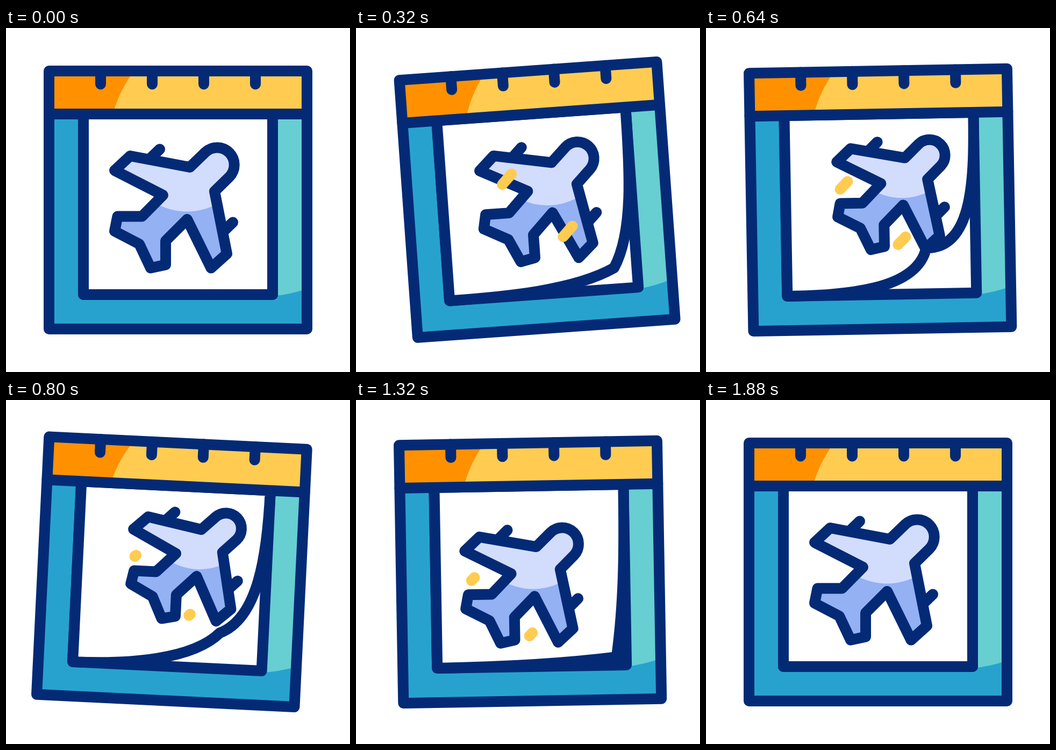
Write an HTML page with a canvas that moves like this. It is 640 px wide and 640 px high and loops after 2 s.

```html
<!DOCTYPE html>
<html lang="en">
<head>
<meta charset="utf-8">
<title>Flight calendar</title>
<style>
html, body { margin: 0; width: 100%; height: 100%; overflow: hidden; background: #fff; }
canvas { display: block; width: 640px; height: 640px; }
</style>
</head>
<body>
<canvas id="stage" width="640" height="640"></canvas>
<script>
const ctx = document.getElementById("stage").getContext("2d");
const LOOP = 2000, STEP = 40, LAST = 1880;
const NAVY = "#042a76", TEAL = "#27a2ce", AQUA = "#67ced2";
const ORANGE = "#ff9100", YELLOW = "#ffcc51", LIGHT = "#d2dcfd", BLUE = "#93b1f3";

const smooth = u => u * u * (3 - 2 * u);
const linear = u => u;
const easeOut = u => 1 - Math.pow(1 - u, 1.3);
const mix = (a, b, f) => Array.isArray(a) ? a.map((v, i) => mix(v, b[i], f)) : a + (b - a) * f;
const part = (t, a, b) => smooth(Math.min(1, Math.max(0, (t - a) / (b - a))));

// Keys are [time, value, ease into this key].
function track(keys, t) {
  for (let i = 1; i < keys.length; i++) {
    const [t0, a] = keys[i - 1], [t1, b, ease = smooth] = keys[i];
    if (t <= t1) return mix(a, b, ease((t - t0) / (t1 - t0)));
  }
  return keys[keys.length - 1][1];
}

const swing = [[0, 0], [440, -5], [840, 3], [1280, -1], [LAST, 0]];
const flight = [[0, 0], [840, 30], [1350, -10], [LAST, 0]];
const size = [[0, 1], [740, 0.9], [LAST, 1]];

// Page corner, then the handles of its lower and right edges.
const flat = [[496, 496], [370, 496], [496, 376]];
const curl = [
  [0, flat],
  [680, [[403, 410], [385, 490], [492, 413]]],
  [800, [[415, 429], [367, 481], [485, 398]], linear],
  [1560, flat, easeOut]
];

function fill(color, path) {
  ctx.fillStyle = color;
  ctx.fill(path);
}

function stroke(path, color = NAVY) {
  ctx.strokeStyle = color;
  ctx.stroke(path);
}

function box(x, y, w, h) {
  const p = new Path2D();
  p.rect(x, y, w, h);
  return p;
}

function line(x0, y0, x1, y1, color) {
  const p = new Path2D();
  p.moveTo(x0, y0);
  p.lineTo(x1, y1);
  stroke(p, color);
}

const body = box(80, 80, 480, 480);
const header = box(80, 80, 480, 80);
const backPage = box(144, 160, 352, 336);
const orangePart = new Path2D("M80 80H238Q212 115 200 156V160H80Z");
const aquaPart = new Path2D("M496 160H560V485Q528 496 496 499Z");

function drawPage(t) {
  const [tip, low, side] = track(curl, t);
  const p = new Path2D();
  p.moveTo(144, 160);
  p.lineTo(496, 160);
  p.bezierCurveTo(496, 280, ...side, ...tip);
  p.bezierCurveTo(...low, 250, 496, 144, 496);
  p.closePath();
  fill("#fff", p);
  stroke(p);
}

const planeShape = new Path2D(
  "M342 259L370.5 231.5A32 32 0 0 1 415.5 277L388 304L411 420L381.5 446.5" +
  "L337 356L297 396V440.5L269 446.5L248 402L202 378L207.5 350.5H253" +
  "L292 311L202 265L231 238Z");
const planeShade = new Path2D("M150 322H270Q335 360 400 324L460 480H150Z");
const engines = new Path2D("M286 225.5L268 243M422 361.5L404 379");

function scaled(path, s) {
  const p = new Path2D();
  p.addPath(path, new DOMMatrix([s, 0, 0, s, 335 * (1 - s), 355 * (1 - s)]));
  return p;
}

function drawPlane(t) {
  const s = track(size, t), shape = scaled(planeShape, s);
  stroke(scaled(engines, s));
  fill(LIGHT, shape);
  ctx.save();
  ctx.clip(shape);
  fill(BLUE, scaled(planeShade, s));
  ctx.restore();
  stroke(shape);
}

function drawStreaks(t) {
  const first = t < 880;
  const head = first ? part(t, 0, 640) : part(t, 880, 1260);
  const tail = first ? part(t, 120, 900) : part(t, 1000, 1400);
  if (head - tail < 0.01) return;
  const a = mix(275, 220, tail), b = mix(275, 220, head);
  line(a, 544.5 - a, b, 544.5 - b, YELLOW);
  line(a + 106, 649.3 - a, b + 106, 649.3 - b, YELLOW);
}

function draw(t) {
  ctx.setTransform(1, 0, 0, 1, 0, 0);
  ctx.fillStyle = "#fff";
  ctx.fillRect(0, 0, 640, 640);
  ctx.lineWidth = 20;
  ctx.lineCap = ctx.lineJoin = "round";

  ctx.translate(320, 80);
  ctx.rotate(track(swing, t) * Math.PI / 180);
  ctx.translate(-320, -80);

  fill(TEAL, body);
  fill(AQUA, aquaPart);
  fill("#fff", backPage);
  stroke(backPage);
  drawPage(t);

  fill(YELLOW, header);
  fill(ORANGE, orangePart);
  for (let x = 176; x < 500; x += 96) line(x, 80, x, 104.5);
  line(80, 160, 560, 160);
  stroke(body);

  const d = track(flight, t);
  ctx.translate(d, -d);
  drawPlane(t);
  drawStreaks(t);
}

const begin = performance.now();

function tick() {
  const t = (performance.now() - begin) % LOOP;
  draw(Math.min(LAST, Math.floor(t / STEP) * STEP));
  requestAnimationFrame(tick);
}
tick();
</script>
</body>
</html>
```
